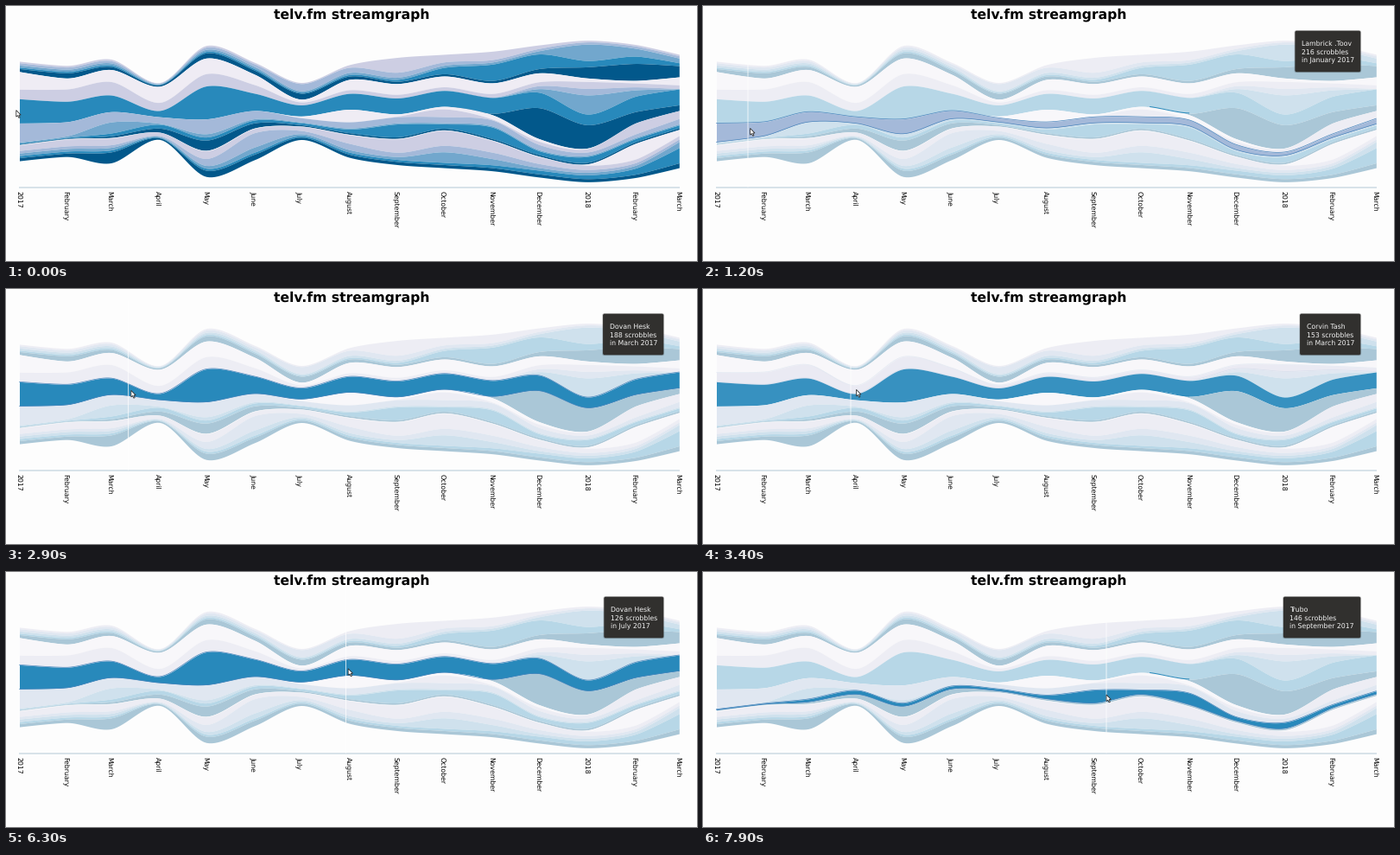
These frames come from a looping animation (800 px wide and 295 px high, 8 s). A matplotlib script:

```python
import numpy as np
import matplotlib.pyplot as plt
from matplotlib.animation import FuncAnimation
from matplotlib.colors import to_rgb
from matplotlib.patches import FancyBboxPatch, Polygon

plt.rcParams["text.hinting"] = "none"

W, H, DPI = 800, 295, 100
FRAMES, STEP = 80, 100
PX = 72 / DPI                      # points per pixel
BG = np.array(to_rgb("#fdfdfd"))
PALETTE = ["#02588b", "#2889bb", "#72a7cd", "#a4b9d9", "#cdcee3", "#efecf4"]
STROKE = np.array(to_rgb("#4a86bd"))
MID_Y = 121.5                      # the stack is centred on this line
PLAYS_PER_PX = 9.8
DIM = 0.33
FADE = 250

MONTHS = ["January", "February", "March", "April", "May", "June", "July",
          "August", "September", "October", "November", "December"]
DAYS = [31, 28, 31, 30, 31, 30, 31, 31, 30, 31, 30, 31, 31, 28]
month_day = np.concatenate([[0], np.cumsum(DAYS)])
month_x = 15.5 + 763.8 * month_day / month_day[-1]
month = np.arange(len(month_x))

activity = np.ones(len(month))
activity[[3, 6]] = 0.3, 0.7        # quiet April and July


def band(base, *bumps):
    """Layer size per month: a base level plus (month, height, spread) bumps."""
    size = base * activity
    for centre, height, *spread in bumps:
        width = spread[0] if spread else 0.45
        size = size + height * np.exp(-((month - centre) / width) ** 2 / 2)
    return np.maximum(size, 0)


# Top to bottom
bands = [
    band(1.8, (8, 14.5), (9.7, 8.5, .8)),
    band(2.6, (6, 5.5), (7.6, 3.5, 1)),
    band(2.4, (12, 16), (13.3, 6, .6)),
    band(1.7, (10.4, 19, .9), (13, 6.5, .6)),
    band(2.6, (1, 3.4, .6), (4, 3.4, .6), (6, 5, .6), (13, 17, 1)),
    band(12.5, (0, 8, .35), (3.2, 16, .55), (6, -5.5), (12.6, -10.5, .9)),
    band(4.2, (0, 2.5), (1.7, 11.7, 1.2), (4.3, 9, .7), (12, 3.8)),
    band(0, (12, 7.5, .8)),
    band(0, (12.1, 22.5, .6)),
    band(18.35, (0, 9.7, .9), (4, 19.7), (12, -6)),
    band(0, (11, 27, .4), (12.1, 26, .75), (14, 5.5)),
    band(0, (7, 14.5, .5), (10, 5, 1)),
    band(0, (9, 9), (11, 3.5), (13.3, 13.5, .8)),
    band(7, (0, 15, 1), (2.5, 4, .6), (4, 10, .6), (12.4, -3.5, .9)),
    band(1.3, (2, 11.5, .4), (4, 2.5)),
    band(3.3, (.5, -3, .7), (3, 3.5), (8, 11.6), (10, 10), (12, 3.5)),
    band(1.8, (.5, -1.5, .7), (4, 10, .75)),
    band(.6, (13.25, 20, .5)),
    band(4, (1.5, 4, 1.4), (4, 4), (8.8, 13.5, 1.4)),
    band(3, (4.8, 14.5, .55), (7, 4), (9.5, 5, 1)),
    band(3, (5, 3), (9.3, 11, .5), (14, 4)),
    band(2.3, (11.5, 2.2, 1.2), (14, 15, .6)),
    band(3.6, (2, 9, .4), (4.4, 4.5, .6), (14, 2)),
]

N = len(bands)
colors = [np.array(to_rgb(PALETTE[(N - 1 - k) % 6])) for k in range(N)]

CORVIN, DOVAN, ILVA, LAMBRICK, TRUBO = 6, 9, 11, 13, 15
ARTISTS = {CORVIN: "Corvin Tash", DOVAN: "Dovan Hesk", ILVA: "Ilva Munt",
           LAMBRICK: "Lambrick .Toov", TRUBO: "Trubo"}

# (time in ms, layer under the pointer)
HOVERS = [(150, DOVAN), (690, LAMBRICK), (1480, DOVAN), (3325, CORVIN),
          (3650, DOVAN), (6480, ILVA), (6650, LAMBRICK), (6870, TRUBO)]

# Pointer path: time in ms, x, y
PATH = [(0, 10, 120), (200, 16.5, 122), (1200, 52, 143), (2100, 94.5, 118),
        (3400, 171, 117), (4000, 242, 110), (4200, 242, 110),
        (4700, 285, 107.5), (5100, 319, 119), (6300, 393.5, 108),
        (6850, 420, 146), (7200, 436, 147), (7300, 436, 147),
        (7900, 467, 142)]
LAG = 55                           # the guide line trails the pointer


def pointer(t):
    times, px, py = zip(*PATH)
    return np.interp(t, times, px), np.interp(t, times, py)


def cardinal(p):
    """Sample an open cardinal spline (tension 0.7) through p."""
    tan = 0.15 * (p[2:] - p[:-2])
    c1, c2 = p[:-1].copy(), p[1:].copy()
    c1[1:] += tan
    c2[:-1] -= tan
    first, last = p[1] - tan[0] * 2 / 3, p[-2] + tan[-1] * 2 / 3
    c1[0], c2[0] = (p[0] + 2 * first) / 3, (p[1] + 2 * first) / 3
    c1[-1], c2[-1] = (p[-2] + 2 * last) / 3, (p[-1] + 2 * last) / 3
    u = np.linspace(0, 1, 16, endpoint=False)
    a, b, c, d = (v[:, None] for v in (p[:-1], c1, c2, p[1:]))
    v = 1 - u
    curve = a * v**3 + 3 * b * u * v**2 + 3 * c * u**2 * v + d * u**3
    return np.append(curve.ravel(), p[-1])


def ease(u):
    u = min(max(u, 0), 1)
    return 4 * u**3 if u < 0.5 else 1 - 4 * (1 - u)**3


def hover_at(t):
    past = [layer for start, layer in HOVERS if start <= t]
    return past[-1] if past else None


def opacity_at(t):
    level = np.ones(N)
    ends = [start for start, _ in HOVERS[1:]] + [FRAMES * STEP]
    for (start, layer), end in zip(HOVERS, ends):
        goal = np.full(N, DIM)
        goal[layer] = 1
        level = level + (goal - level) * ease((min(t, end) - start) / FADE)
    return level


def mix(color, level):
    return tuple(BG + (color - BG) * level)


fig = plt.figure(figsize=(W / DPI, H / DPI), dpi=DPI, facecolor=BG)
ax = fig.add_axes([0, 0, 1, 1])
ax.set_xlim(0, W)
ax.set_ylim(H, 0)
ax.axis("off")


def label(x, y, text, size, **kw):
    kw = {"family": "DejaVu Sans", "va": "baseline", **kw}
    return ax.text(x, y, text, fontsize=size * PX, **kw)


label(400, 15, "telv.fm streamgraph", 15.6, weight="bold", ha="center",
      color="black")

# Streams
xs = cardinal(month_x)
total = np.sum(bands, axis=0)
edges = np.vstack([0 * total, np.cumsum(bands, axis=0)]) + MID_Y - total / 2
curves = [cardinal(e) for e in edges]
fills = [ax.fill_between(xs, curves[k], curves[k + 1], color=colors[k], lw=0)
         for k in range(N)]

part = (xs > 515) & (xs < 566)
sliver, = ax.plot(xs[part], curves[DOVAN + 1][part] - 0.3, lw=PX,
                  color=colors[DOVAN], solid_capstyle="butt")
outline = [ax.plot([], [], lw=0.7 * PX)[0] for _ in range(2)]

# Axis
ax.plot([15.5, 779.5], [210, 210], color="#b4c8d6", lw=PX, snap=False)
for k, x in enumerate(month_x):
    name = str(2017 + k // 12) if k % 12 == 0 else MONTHS[k % 12]
    label(x - 4.2, 214, name, 7.8, rotation=-90, rotation_mode="anchor",
          ha="left", color="black")

guide, = ax.plot([], [], color="white", lw=PX, alpha=0.75, snap=False)


def tip_box(color, alpha, z):
    box = FancyBboxPatch((685, 29), 76, 47, fc=color, ec="none", alpha=alpha,
                         boxstyle="round,pad=0,rounding_size=2", zorder=z)
    return ax.add_patch(box)


shadow = tip_box("black", 0.2, 5)
tip = tip_box("#31302e", 1, 6)
lines = [label(693, y, "", 7.76, color="#f2f2f2", zorder=7)
         for y in (46, 55.4, 64.7)]

ARROW = np.array([(0, 0), (0, 7.6), (1.8, 6.1), (3.1, 8.9), (4.4, 8.3),
                  (3.1, 5.6), (5.4, 5.5)])
arrow = ax.add_patch(Polygon(ARROW, closed=True, fc="white", ec="#2a2a2a",
                             lw=0.8 * PX, zorder=8))


def show_tip(layer, x):
    m = max(int(np.searchsorted(month_x, x, side="right")) - 1, 0)
    plays = round(bands[layer][m] * PLAYS_PER_PX)
    rows = [ARTISTS[layer], f"{plays} scrobbles",
            f"in {MONTHS[m % 12]} {2017 + m // 12}"]
    for item, row in zip(lines, rows):
        item.set_text(row)
    renderer = fig.canvas.get_renderer()
    width = max(item.get_window_extent(renderer).width for item in lines)
    left = 754 - width
    for item in lines:
        item.set_x(left)
    for box, grow in ((shadow, 0.8), (tip, 0)):
        box.set_bounds(left - 7.5 - grow, 28.6 - grow / 2,
                       width + 14.8 + 2 * grow, 47.7 + 1.5 * grow)


def update(i):
    t = i * STEP
    layer = hover_at(t)
    level = opacity_at(t)
    for fill, color, a in zip(fills, colors, level):
        fill.set_facecolor(mix(color, a))

    active = layer is not None
    for item in [guide, shadow, tip, *lines, *outline]:
        item.set_visible(active)
    sliver.set_visible(active and layer != DOVAN)

    if active:
        x = pointer(t)[0]
        guide.set_data([x, x], [14, 209])
        show_tip(layer, x)
        shown = (level[layer] - DIM) / (1 - DIM)
        for k, edge in enumerate(outline):
            edge.set_data(xs, curves[layer + k])
            edge.set_color(STROKE)
            edge.set_alpha(min(max(shown, 0), 1))

    arrow.set_xy(ARROW + pointer(t + LAG))
    return fills


anim = FuncAnimation(fig, update, frames=FRAMES, interval=STEP, repeat=True,
                     repeat_delay=0, blit=False)
plt.show()
```
